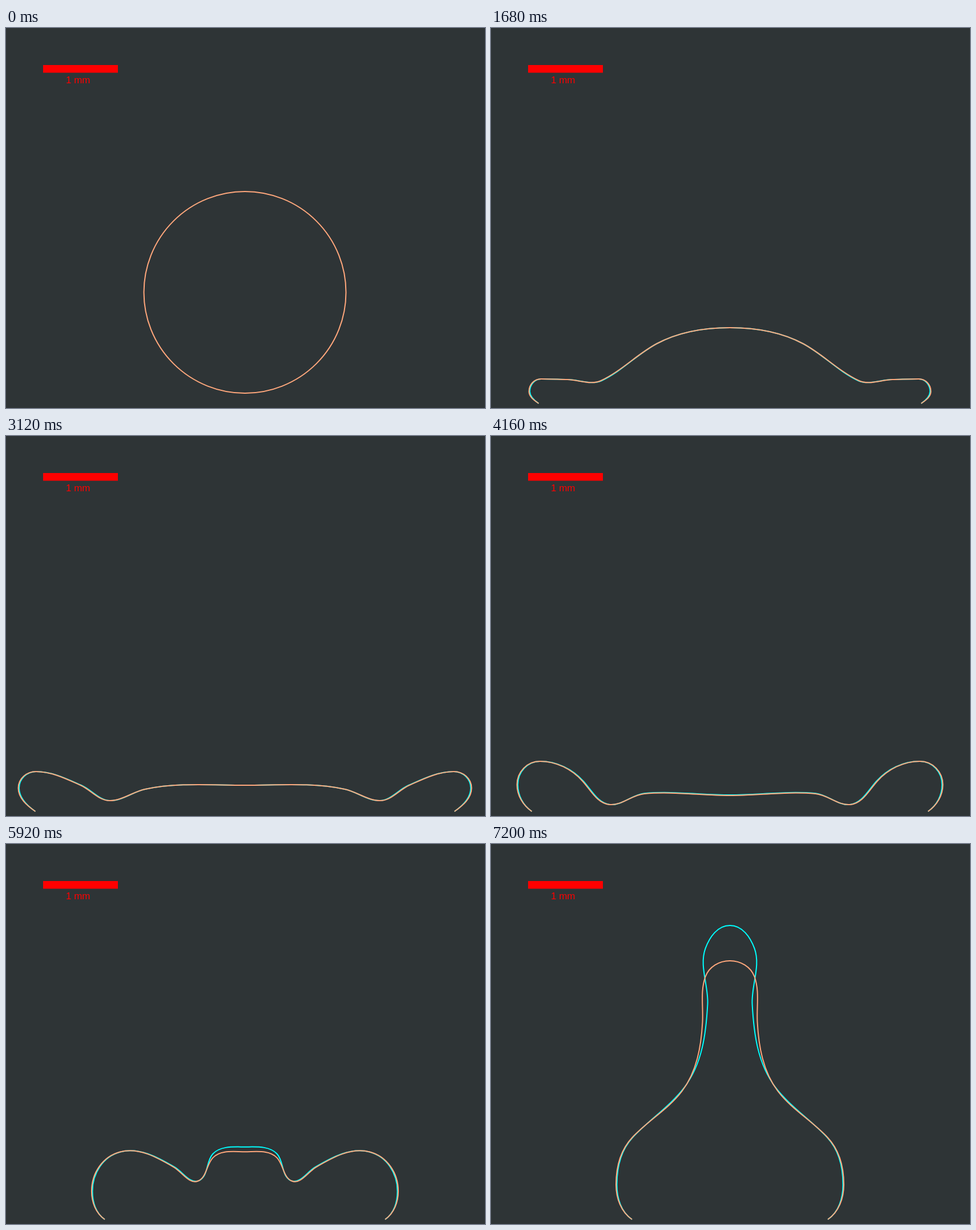
An HTML page with a canvas for the animation above (7.28 s loop, 839 by 667 pixels).

```html
<!DOCTYPE html>
<html lang="en">
<head>
<meta charset="utf-8">
<title>Drop impact</title>
<style>
html, body { margin: 0; width: 100%; height: 100%; overflow: hidden; background: #2e3436; }
canvas { display: block; }
</style>
</head>
<body>
<canvas id="stage" width="839" height="667"></canvas>
<script>
const ctx = document.getElementById('stage').getContext('2d');
const LOOP = 7280, STEP = 80, TOUCH = 160;
const AXIS = 418.5, FLOOR = 659, RADIUS = 177;
const ORANGE = '#ffa77c', CYAN = '#00ffff', RED = '#ff0000';
const RAD = Math.PI / 180;

const dropCentre = t => 464 + 13 * t / STEP;

// A half profile is seven nodes [x, y, heading in degrees]:
// apex, crest, dip, slope, rim, edge, foot.
function cutCircle() {
  const cy = dropCentre(TOUCH);
  const end = Math.acos((cy - FLOOR) / RADIUS) / RAD;
  return [0, 0.3, 0.5, 0.73, 0.86, 0.94, 1].map(part => {
    const a = part * end;
    return [RADIUS * Math.sin(a * RAD), cy - RADIUS * Math.cos(a * RAD), a];
  });
}

function pose(time, lift, apexY, crest, dip, slope, rim, [edgeX, edgeY], footX) {
  return { time, lift, nodes: [[0, apexY, 0], crest, dip, slope, rim,
    [edgeX, edgeY, 90], [footX, FLOOR, 145]] };
}

const poses = [
  { time: TOUCH, lift: 0, nodes: cutCircle() },
  pose(800, 0, 417, [135, 480, 50], [177, 566, 75], [203, 620, 50], [234, 628, 5], [250, 644], 240),
  pose(1680, 0, 526, [128, 554, 28], [226, 619, 25], [285, 617, -1], [331, 616, 0], [352, 638], 335),
  pose(3120, 0, 613, [175, 620, 12], [237, 640, 0], [288, 613, -24], [366, 589, 0], [397, 618], 367),
  pose(4160, 1, 631, [150, 628, 5], [211, 647, -5], [258, 606, -48], [333, 571, 0], [373, 612], 347),
  pose(5280, 6, 626, [85, 624, 14], [124, 646, -12], [165, 604, -50], [254, 551, 0], [313, 610], 288),
  pose(6560, 18, 380, [42, 405, 70], [53, 470, 74], [97, 501, 9], [191, 529, 36], [227, 608], 204),
  pose(7200, 62, 205, [43, 233, 70], [48, 312, 87], [84, 434, 53], [171, 515, 47], [199.5, 598], 171.5),
];
const MAX_LIFT = 62;

// Smooth interpolation through the poses that never overshoots them.
function valueAt(t, read) {
  const last = poses.length - 1;
  const gap = i => poses[i + 1].time - poses[i].time;
  const rate = i => (read(poses[i + 1]) - read(poses[i])) / gap(i);
  const inner = i => {
    const a = rate(i - 1), b = rate(i);
    if (a * b <= 0) return 0;
    const mean = (a * gap(i) + b * gap(i - 1)) / (gap(i) + gap(i - 1));
    return Math.sign(a) * Math.min(Math.abs(mean), 3 * Math.abs(a), 3 * Math.abs(b));
  };
  const tangent = i => {
    if (i === 0) return 1.5 * rate(0) - 0.5 * inner(1);
    if (i === last) return 1.5 * rate(last - 1) - 0.5 * inner(last - 1);
    return inner(i);
  };
  let k = 0;
  while (k < last - 1 && t > poses[k + 1].time) k++;
  const u = (t - poses[k].time) / gap(k), v = 1 - u;
  return v * v * (1 + 2 * u) * read(poses[k]) + u * u * (3 - 2 * u) * read(poses[k + 1])
    + gap(k) * u * v * (v * tangent(k) - u * tangent(k + 1));
}

const profileAt = t => poses[0].nodes.map((node, n) =>
  node.map((_, c) => valueAt(t, p => p.nodes[n][c])));

// The cyan profile is slightly narrower and its jet runs ahead.
function leadProfile(nodes, t) {
  const lift = valueAt(t, p => p.lift), pull = lift * lift / MAX_LIFT;
  const inset = 1.5 * Math.min(1, (t - TOUCH) / 1500);
  const rise = [lift, 0.8 * lift, 0.5 * pull, 0.12 * pull, 0, 0, 0];
  const squeeze = [0, 0, inset + 0.12 * pull, inset + 0.05 * pull, inset / 2, inset, 0];
  return nodes.map(([x, y, a], i) => [x - squeeze[i], y - rise[i], a]);
}

// Joins nodes with curves that are circular arcs when the headings allow it.
function strokeProfile(half, color) {
  const mirrored = half.slice(1).reverse().map(([x, y, a]) => [-x, y, -a]);
  const nodes = mirrored.concat(half);
  ctx.strokeStyle = color;
  ctx.beginPath();
  nodes.forEach(([x, y, a], i) => {
    if (i === 0) return ctx.moveTo(AXIS + x, y);
    const [px, py, pa] = nodes[i - 1];
    const h = Math.hypot(x - px, y - py) / (3 * Math.cos((a - pa) * RAD / 4) ** 2);
    ctx.bezierCurveTo(
      AXIS + px + h * Math.cos(pa * RAD), py + h * Math.sin(pa * RAD),
      AXIS + x - h * Math.cos(a * RAD), y - h * Math.sin(a * RAD),
      AXIS + x, y);
  });
  ctx.stroke();
}

function drawScale() {
  ctx.fillStyle = RED;
  ctx.fillRect(65, 65, 131, 13.5);
  ctx.font = '17px "Liberation Sans", Arial, sans-serif';
  ctx.fillText('1 mm', 105, 97);
}

function draw(t) {
  ctx.fillStyle = '#2e3436';
  ctx.fillRect(0, 0, 839, 667);
  drawScale();
  ctx.lineWidth = 2;
  if (t < TOUCH) {
    ctx.strokeStyle = ORANGE;
    ctx.beginPath();
    ctx.arc(AXIS, dropCentre(t), RADIUS, 0, 2 * Math.PI);
    ctx.stroke();
  } else {
    const profile = profileAt(t);
    strokeProfile(leadProfile(profile, t), CYAN);
    strokeProfile(profile, ORANGE);
  }
}

const start = performance.now();
function tick() {
  const t = (performance.now() - start) % LOOP;
  draw(Math.floor(t / STEP) * STEP);
  requestAnimationFrame(tick);
}
tick();
</script>
</body>
</html>
```
